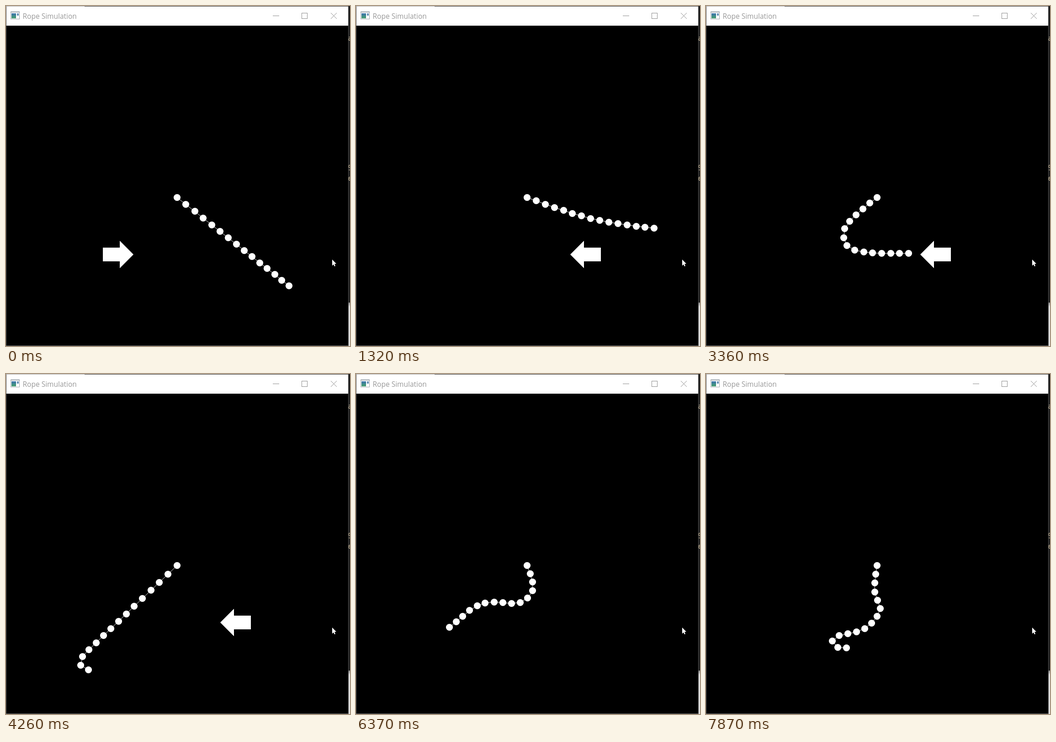
These frames come from a looping animation (753 px wide and 743 px high, 7990 ms). An HTML page with a canvas:

```html
<!DOCTYPE html>
<html lang="en">
<head>
<meta charset="utf-8">
<title>Rope Simulation</title>
<style>
  html, body { margin: 0; width: 100%; height: 100%; overflow: hidden; background: #000; }
  canvas { display: block; }
</style>
</head>
<body>
<canvas id="stage" width="753" height="743"></canvas>
<script>
const ctx = document.getElementById('stage').getContext('2d');
const LOOP = 7990;
const STEP = 131;        // usual time between picture updates, ms
const SEGMENTS = 14;
const REST_LENGTH = 275;
const ANCHOR = [374, 418];

const lerp = (a, b, k) => a + (b - a) * k;
const dist = (a, b) => Math.hypot(b[0] - a[0], b[1] - a[1]);

// Hermite curve from a to b with tangents ma and mb.
function hermite(a, b, ma, mb, u) {
  const w = u * u * (3 - 2 * u);
  return lerp(a, b, w) + u * (1 - u) * ((1 - u) * ma - u * mb);
}

// Smooth dense polyline through the points (centripetal spline, natural ends).
function curve(p) {
  const last = p.length - 1;
  const d = p.slice(1).map((q, i) => Math.sqrt(dist(p[i], q)));
  const chord = (i, c) => (p[i + 1][c] - p[i][c]) / d[i];
  const inner = (i, c) => chord(i - 1, c) + chord(i, c)
    - (p[i + 1][c] - p[i - 1][c]) / (d[i - 1] + d[i]);
  function tangent(i, c) {
    if (i > 0 && i < last) return inner(i, c);
    const edge = chord(i ? last - 1 : 0, c);
    return last === 1 ? edge : 1.5 * edge - 0.5 * inner(i ? last - 1 : 1, c);
  }
  const out = [p[0]];
  for (let i = 0; i < last; i++) {
    for (let k = 1; k <= 40; k++) {
      out.push([0, 1].map(c => hermite(p[i][c], p[i + 1][c],
        tangent(i, c) * d[i], tangent(i + 1, c) * d[i], k / 40)));
    }
  }
  return out;
}

// Place the beads along a line; a stretched rope is longest near its anchor.
function beadsOn(line) {
  const at = [0];
  for (let i = 1; i < line.length; i++) at.push(at[i - 1] + dist(line[i - 1], line[i]));
  const total = at[at.length - 1];
  const ratio = 1 + Math.max(0, total - REST_LENGTH) / 150;
  const beads = [line[0]];
  let s = 0, j = 0;
  for (let i = 0; i < SEGMENTS; i++) {
    s += lerp(ratio, 1, i / (SEGMENTS - 1)) * total / (SEGMENTS * (ratio + 1) / 2);
    while (j < line.length - 2 && at[j + 1] < s) j++;
    const k = Math.min(1, (s - at[j]) / (at[j + 1] - at[j]));
    beads.push([0, 1].map(c => lerp(line[j][c], line[j + 1][c], k)));
  }
  return beads;
}

// A pose holds the angle of every segment, then the lengths.
function pose(time, ...points) {
  const beads = beadsOn(curve([ANCHOR, ...points]));
  const ends = beads.slice(1).map((b, i) => [beads[i], b]);
  const angles = ends.map(([a, b]) => {
    const angle = Math.atan2(b[1] - a[1], b[0] - a[0]);
    return angle < -Math.PI / 2 ? angle + 2 * Math.PI : angle;
  });
  return { time, v: [...angles, ...ends.map(([a, b]) => dist(a, b))] };
}

const POSES = [
  pose(0, [619, 611]),
  pose(1320, [515, 464], [652, 485]),
  pose(2520, [346, 448], [342, 467], [378, 483], [477, 478], [552, 500]),
  pose(3240, [302, 490], [310, 525], [443, 540]),
  pose(3750, [262, 530], [247, 550], [262, 566], [335, 574]),
  pose(4260, [184, 599], [168, 615], [163, 636], [180, 646]),
  pose(4980, [246, 507], [96, 588]),
  pose(5560, [258, 502], [123, 546]),
  pose(6490, [390, 475], [366, 497], [280, 497], [214, 553]),
  pose(7120, [374, 438], [387, 476], [382, 495], [344, 491], [311, 508],
    [294, 499], [260, 513], [247, 527], [267, 559]),
  pose(7870, [369, 478], [381, 515], [345, 557], [290, 572], [276, 583],
    [288, 597], [307, 598])
];

function rate(i, c) {
  const a = POSES[i], b = POSES[i + 1];
  return (b.v[c] - a.v[c]) / (b.time - a.time);
}

// Rate of change at a pose, limited so that motion never overshoots it.
function slope(i, c) {
  if (i === 0) return rate(0, c);
  if (i === POSES.length - 1) return rate(i - 1, c);
  const a = rate(i - 1, c), b = rate(i, c);
  return a * b <= 0 ? 0 : 2 * a * b / (a + b);
}

function ropeAt(t) {
  let i = 0;
  while (i < POSES.length - 2 && t >= POSES[i + 1].time) i++;
  const a = POSES[i], b = POSES[i + 1];
  const span = b.time - a.time;
  const steps = Math.round(span / STEP);
  const u = Math.min(1, Math.floor((t - a.time) / span * steps + 1e-6) / steps);
  const v = a.v.map((x, c) =>
    hermite(x, b.v[c], slope(i, c) * span, slope(i + 1, c) * span, u));
  let [x, y] = ANCHOR;
  const points = [[x, y]];
  for (let k = 0; k < SEGMENTS; k++) {
    x += v[k + SEGMENTS] * Math.cos(v[k]);
    y += v[k + SEGMENTS] * Math.sin(v[k]);
    points.push([x, y]);
  }
  return points;
}

function rect(color, x, y, w, h) {
  ctx.fillStyle = color;
  ctx.fillRect(x, y, w, h);
}

function trace(points) {
  ctx.beginPath();
  points.forEach(([x, y]) => ctx.lineTo(x, y));
}

function polygon(color, points) {
  trace(points);
  ctx.fillStyle = color;
  ctx.fill();
}

function stroke(color, points) {
  trace(points);
  ctx.strokeStyle = color;
  ctx.lineWidth = 1;
  ctx.stroke();
}

function fade(y0, y1, from, to) {
  const g = ctx.createLinearGradient(0, y0, 0, y1);
  g.addColorStop(0, from);
  g.addColorStop(1, to);
  return g;
}

function drawIcon() {
  rect('#9aa3aa', 10, 12, 20, 17);
  rect('#fff', 11, 14, 18, 14);
  rect(fade(16, 27, '#3c72b0', '#45a06c'), 12, 16, 10, 11);
  rect('#6d94b8', 24, 16, 4, 5);
}

function drawTitleBar() {
  rect('#fff', 1, 1, 748, 42);
  rect('#2a2a2a', 0, 0, 753, 1);
  rect('#aaa', 0, 0, 172, 1);
  drawIcon();
  ctx.fillStyle = '#999';
  ctx.font = '15.5px "Open Sans", "Noto Sans", sans-serif';
  ctx.fillText('Rope Simulation', 36.5, 28);
  const gray = '#8c8c8c';
  rect(gray, 584, 21, 14, 1);
  ctx.strokeStyle = gray;
  ctx.lineWidth = 1;
  ctx.strokeRect(647.5, 15.5, 12, 12);
  stroke(gray, [[711, 15], [724, 28]]);
  stroke(gray, [[724, 15], [711, 28]]);
}

function drawBackdrop() {
  rect('#1c1c1c', 0, 0, 753, 743);
  ctx.font = '16px "Noto Sans Mono", monospace';
  ctx.fillStyle = '#c4b394';
  ctx.fillText('a', 748.5, 76);
  ctx.fillText('9', 748.5, 359);
  ctx.fillText('e', 748.5, 382);
  rect(fade(648, 657, '#888', '#dcdcdc'), 750, 648, 3, 95);
  rect('#555', 0, 1, 750, 742);
  rect('#000', 1, 43, 748, 699);
  rect('#777', 0, 742, 750, 1);
}

function drawArrow(tip, dir) {
  const at = (back, y) => [tip - dir * back, y];
  polygon('#fff', [
    at(0, 543), at(30, 513), at(30, 528), at(67, 528),
    at(67, 558), at(30, 558), at(30, 573)
  ]);
}

function drawCursor() {
  polygon('#fff', [
    [714, 554], [714, 567.5], [717, 564.7], [719, 569],
    [721, 568], [719.2, 563.8], [723, 563.3]
  ]);
}

function drawRope(points) {
  ctx.save();
  ctx.translate(0.5, 0.5);
  stroke('#e4e4e4', points);
  ctx.fillStyle = '#fff';
  for (const [x, y] of points) {
    ctx.beginPath();
    ctx.arc(Math.round(x), Math.round(y), 7.6, 0, 2 * Math.PI);
    ctx.fill();
  }
  ctx.restore();
}

function draw(t) {
  drawBackdrop();
  drawTitleBar();
  if (t < 1200) drawArrow(279, 1);
  else if (t < 4900) drawArrow(469, -1);
  drawRope(ropeAt(t));
  drawCursor();
}

const start = performance.now();
function tick() {
  draw((performance.now() - start) % LOOP);
  requestAnimationFrame(tick);
}
tick();
</script>
</body>
</html>
```
